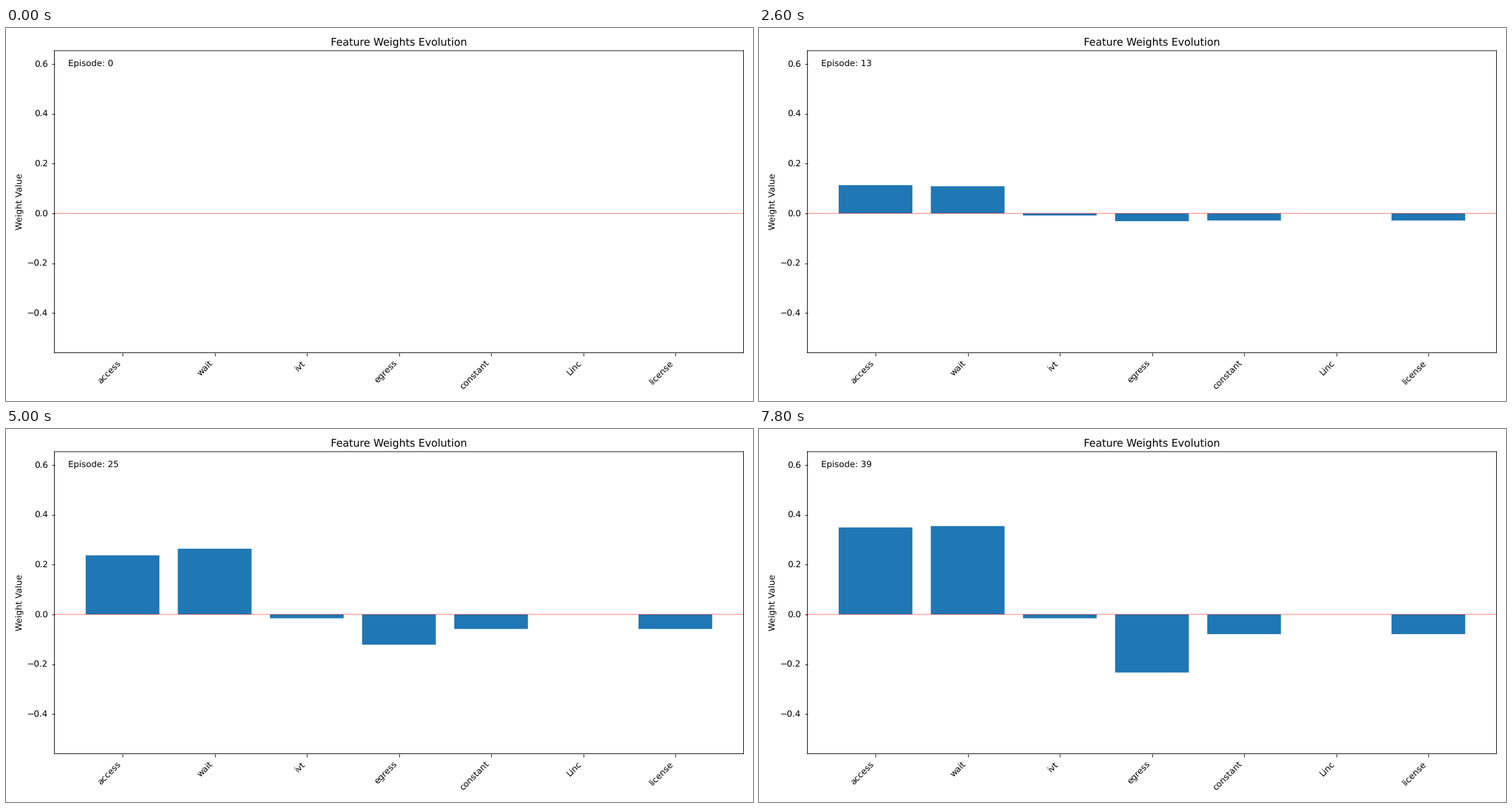
A matplotlib script for the animation above (8 s loop, 1058x529 px).

```python
import numpy as np
import matplotlib.pyplot as plt
from matplotlib.animation import FuncAnimation

W, H = 1058, 529
EPISODES, STEP_MS = 40, 200

LEFT, RIGHT, TOP, BOTTOM = 68.5, 1044.6, 32.1, 460.6


def drift(rate, *turns):
    """Weight that changes at a steady rate, altered at each (episode, change)."""
    return lambda e: rate * e + sum(c * max(0, e - start) for start, c in turns)


cost = drift(-0.0017, (5, -0.0008), (26, 0.0011))
FEATURES = {
    "access": drift(0.0074, (7, 0.0029), (31, -0.0040)),
    "wait": drift(0.0064, (9, 0.0065), (26, -0.0069)),
    "ivt": drift(0.0012, (5, -0.0030), (17, 0.0018)),
    "egress": drift(-0.0024, (14, -0.0056)),
    "constant": cost,
    "Linc": drift(0),
    "license": cost,
}

# Thin, unsnapped strokes and unhinted glyphs keep the soft edges.
plt.rcParams.update({
    "font.family": "DejaVu Sans",
    "text.hinting": "none",
    "path.snap": False,
    "axes.linewidth": 0.72,
    "xtick.major.width": 0.72,
    "ytick.major.width": 0.72,
})

fig = plt.figure(figsize=(12, 6), dpi=W / 12, facecolor="white")
ax = fig.add_axes([LEFT / W, 1 - BOTTOM / H,
                   (RIGHT - LEFT) / W, (BOTTOM - TOP) / H])

spots = range(len(FEATURES))
bars = ax.bar(spots, np.zeros(len(FEATURES)), color="#1f77b4")
ax.axhline(0, color="r", alpha=0.3, linewidth=1.44)
ax.set_xlim(-0.74, 6.74)
ax.set_ylim(-0.56, 0.654)
ax.set_xticks(spots, FEATURES, rotation=45, ha="right")
ax.set_yticks(np.arange(-2, 4) * 0.2)
ax.set_ylabel("Weight Value")
ax.set_title("Feature Weights Evolution")
label = ax.text(0.02, 0.95, "", transform=ax.transAxes)


def update(episode):
    for bar, weight in zip(bars, FEATURES.values()):
        bar.set_height(weight(episode))
    label.set_text(f"Episode: {episode}")
    return [*bars, label]


anim = FuncAnimation(fig, update, frames=EPISODES, interval=STEP_MS,
                     init_func=lambda: update(0), repeat=True, repeat_delay=0)
plt.show()
```
